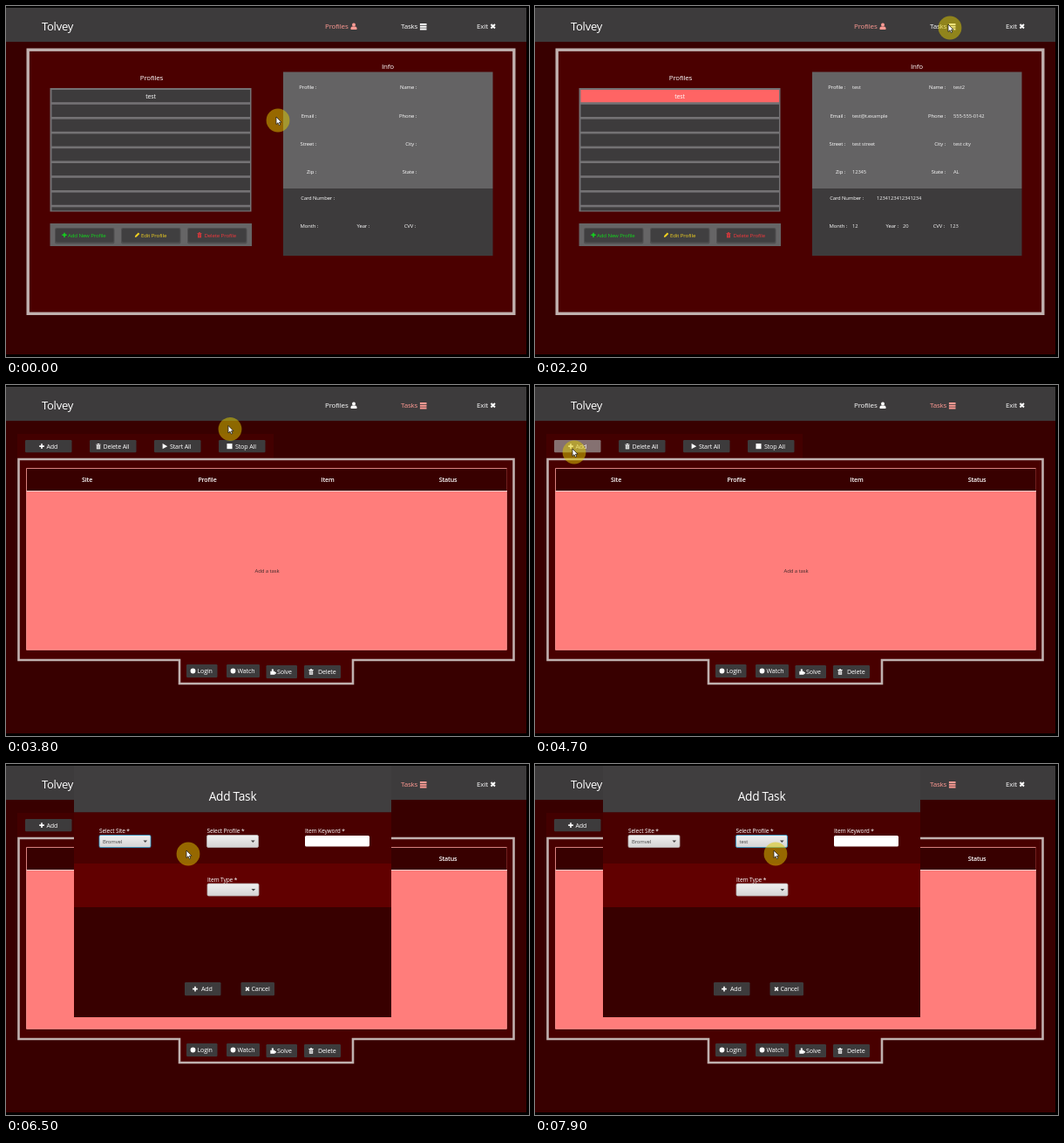
An HTML page for the animation above (8 s loop, 600 px wide and 402 px high).

```html
<!DOCTYPE html>
<html lang="en">
<head>
<meta charset="utf-8">
<title>Task manager walkthrough</title>
<style>
  html, body { margin: 0; width: 100%; height: 100%; overflow: hidden; background: #000; }
  svg { display: block; width: 100vw; height: 100vh; }
  text { font-family: "Open Sans", "Noto Sans", sans-serif; letter-spacing: -0.02em; white-space: pre; }
</style>
</head>
<body>
<svg id="stage" viewBox="0 0 600 402"></svg>
<script>
const LOOP = 8000, STEP = 100;
const GREY = '#3d3b3c', DARK = '#380000', WINE = '#4a0000', FRAME = '#c0b1af', PINK = '#ff9a93';

const rect = (x, y, w, h, fill, extra = '') =>
  `<rect x="${x}" y="${y}" width="${w}" height="${h}" fill="${fill}" ${extra}/>`;
const text = (x, y, size, str, fill = '#fff', anchor = 'start', weight = 400) =>
  `<text x="${x}" y="${y}" font-size="${size}" fill="${fill}" text-anchor="${anchor}" font-weight="${weight}">${str}</text>`;
const group = (id, body, extra = '') => `<g id="${id}" ${extra}>${body}</g>`;

// Icons are drawn around 0,0 in a box of about 8 units.
const ICONS = {
  user: '<circle cy="-2" r="2.1"/><path d="M-3.6 4V2Q-3.6 .2-1.8 .2H1.8Q3.6 .2 3.6 2V4Z"/>',
  tasks: '<path d="M-4-3.4H4V-1.2H-4ZM-4-.4H4V1.6H-4ZM-4 2.4H4V4.4H-4Z"/>',
  cross: '<path d="M-2.4-2.4L2.4 2.4M2.4-2.4L-2.4 2.4" stroke="currentColor" stroke-width="2.1"/>',
  plus: '<path d="M-1-3.5H1V-1H3.5V1H1V3.5H-1V1H-3.5V-1H-1Z"/>',
  pencil: '<path d="M-3.5 3.5L-3 1L1.8-3.7L3.7-1.8L-1 3Z"/>',
  trash: '<path d="M-3.3-3H-1.2V-4H1.2V-3H3.3V-2H-3.3Z"/><path d="M-2.7-1.4H2.7V4H-2.7Z"/><path d="M-1.1-.5V3M1.1-.5V3" stroke="#3d3b3c" stroke-width=".8"/>',
  play: '<path d="M-3-4L4 0L-3 4Z"/>',
  stop: '<path d="M-3.8-3.8H3.8V3.8H-3.8Z"/>',
  puzzle: '<path d="M-4-1H-1.7Q-3-4-.8-4Q1.3-4 .2-1H2.5V.7Q4.5 0 4.5 1.7Q4.5 3.2 2.5 2.6V4H-4Z"/>',
  dot: '<circle r="3.6"/>'
};
const icon = (name, x, y, scale = 0.8, color = '#fff') =>
  `<g transform="translate(${x} ${y}) scale(${scale})" fill="${color}" color="${color}">${ICONS[name]}</g>`;

function button(x, y, w, h, name, ix, tx, label, id = '') {
  const cy = y + h / 2;
  return rect(x, y, w, h, GREY, `rx="1.2" ${id && `id="${id}"`}`) +
    icon(name, ix, cy) + text(tx, cy + 2.5, 7.1, label, '#fff', 'start', 500);
}

function navItem(id, x, label, name, ix) {
  return group(id, text(x, 26, 8, label, 'currentColor', 'start', 500) +
    icon(name, ix, 23.3, 0.95, 'currentColor'), 'color="#fff"');
}

function header() {
  return rect(0, 2, 597, 39, GREY) + text(41, 28, 13, 'Tolvey') +
    navItem('navProfiles', 366, 'Profiles', 'user', 399) +
    navItem('navTasks', 453, 'Tasks', 'tasks', 478.7) +
    navItem('navExit', 540, 'Exit', 'cross', 558.7);
}

function profileButton(x, color, name, ix, tx, label) {
  return rect(x - 1, 254, 68.5, 18.5, '#515051', 'rx="2"') + rect(x, 255, 66.5, 15.5, '#403f40', 'rx="1.5"') +
    icon(name, ix, 262.3, 0.75, color) + text(tx, 264.8, 6.1, label, color, 'start', 500);
}

function profilesPage() {
  let s = rect(25.2, 50.2, 557.6, 302.1, '#4b0000', `stroke="${FRAME}" stroke-width="3.4"`);
  s += text(167, 85, 8, 'Profiles', '#fff', 'middle', 500) + rect(50.5, 94, 231, 141.5, '#747274');
  for (let i = 0; i < 9; i++) {
    const y = 96 + 16.8 * i;
    s += rect(52.5, y, 227.5, Math.min(14.2, 234.3 - y), GREY, i ? '' : 'id="firstRow"');
  }
  s += text(166, 105.5, 6.9, 'test', '#fff', 'middle');
  s += rect(50.5, 249, 231.5, 26, '#666566') +
    profileButton(57, '#12d81c', 'plus', 67, 71, 'Add New Profile') +
    profileButton(133, '#f0d020', 'pencil', 150.5, 155, 'Edit Profile') +
    profileButton(209, '#f0383c', 'trash', 222, 227.5, 'Delete Profile');

  s += text(438, 72, 8, 'Info', '#fff', 'middle', 500) +
    rect(318, 75.5, 240.5, 133.5, '#646364') + rect(318, 209, 240.5, 77, GREY);
  const fields = [
    [356, 95, 'Profile', 364, 'test'], [471, 95, 'Name', 480, 'test2'],
    [356, 127.5, 'Email', 364, 'test@t.example'], [471, 127.5, 'Phone', 480, '555-555-0142'],
    [356, 159.5, 'Street', 364, 'test street'], [471, 159.5, 'City', 480, 'test city'],
    [356, 191.5, 'Zip', 364, '12345'], [471, 191.5, 'State', 480, 'AL'],
    [377, 222, 'Card Number', 392, '1234123412341234'],
    [358, 254, 'Month', 364, '12'], [417, 254, 'Year', 422, '20'], [470, 254, 'CVV', 476, '123']
  ];
  s += fields.map(([x, y, label]) => text(x, y, 5.9, label + ' :', '#fff', 'end', 500)).join('');
  return s + group('values', fields.map(([, y, , x, v]) => text(x, y + 0.4, 5.8, v, '#f4f4f4')).join(''));
}

function tasksPage() {
  return rect(13, 56, 294, 28, '#430000') +
    button(22, 63, 53.5, 14.3, 'plus', 41, 46.5, 'Add', 'addButton') +
    button(96, 63, 53.5, 14.3, 'trash', 106, 111.5, 'Delete All') +
    button(170, 63, 53.5, 14.3, 'play', 182, 188, 'Start All') +
    button(244, 63, 53.5, 14.3, 'stop', 256.5, 263, 'Stop All') +
    `<path d="M14.5 85H582.5V315H398V342H199V315H14.5Z" fill="#480000" stroke="${FRAME}" stroke-width="2.6"/>` +
    rect(23.5, 95.5, 551, 208, '#ff7d7b') + rect(23.5, 95.5, 551, 26, DARK) +
    '<path d="M23.5 122V95.5H574.5" fill="none" stroke="#d88280"/><path d="M23.5 121.5H575" stroke="#f3cfcd"/>' +
    '<path d="M23.5 122V303.3H574.3V122" fill="none" stroke="#ff9c9a" stroke-width=".8"/>' +
    [['Site', 93], ['Profile', 231], ['Item', 369], ['Status', 507]]
      .map(([label, x]) => text(x, 110.5, 7.1, label, '#fff', 'middle', 600)).join('') +
    text(299.5, 215.3, 6, 'Add a task', '#3b2929', 'middle') +
    button(207, 320, 35.5, 15, 'dot', 214.5, 219.5, 'Login') +
    button(253, 320, 38, 15, 'dot', 260.5, 265.5, 'Watch') +
    button(298.5, 321, 35.5, 15, 'puzzle', 306.5, 311, 'Solve') +
    button(342, 321, 42, 15, 'trash', 350, 358, 'Delete');
}

function combo(id, x, y, value) {
  return rect(x, y, 59, 14, 'url(#comboFill)', `id="${id}Box" rx="1.5" stroke="#b5b1b1" stroke-width=".8"`) +
    `<path d="M${x + 50.5} ${y + 6}h4.6l-2.3 2.6z" fill="#444"/>` +
    group(id + 'Value', text(x + 4, y + 9.3, 5.9, value, '#444'));
}

function popup(id, x, y, value) {
  return group(id, rect(x, y, 59, 14, '#f6f6f6', 'stroke="#bbb" stroke-width=".7"') +
    rect(x + 0.5, y + 1, 58, 12, '#0a93c4') + text(x + 4, y + 9.2, 5.9, value));
}

function dialog() {
  const label = (x, y, str) => text(x, y, 6.6, str, '#fff', 'start', 500);
  return rect(78, 2, 364, 288, DARK) + rect(78, 2, 364, 53.5, '#403e3f') +
    rect(78, 55.5, 364, 58.5, WINE) + rect(78, 114, 364, 50, '#610000') +
    text(260, 41.5, 13.7, 'Add Task', '#fff', 'middle') +
    label(107, 78.8, 'Select Site *') + label(230.5, 78.8, 'Select Profile *') +
    label(343, 78.8, 'Item Keyword *') + label(231, 134.5, 'Item Type *') +
    combo('site', 107, 81.5, 'Bromvel') + combo('profile', 230.5, 81.5, 'test') +
    rect(343, 82, 74, 12.5, '#fff', 'rx="1.5"') + combo('type', 231, 137, '') +
    button(205, 250, 41.5, 15.3, 'plus', 217, 224, 'Add') +
    button(269.5, 250, 38.5, 15.3, 'cross', 277, 281.5, 'Cancel') +
    popup('siteList', 107, 96, 'Bromvel') + popup('profileList', 230.5, 96, 'test');
}

const cursor = '<circle r="13.4" fill="#dcc800" fill-opacity=".52"/>' +
  '<path d="M-2-4V4.5L0 2.7L1.4 5.7L2.8 5L1.4 2.2H4Z" fill="#fff" stroke="#111" stroke-width=".7"/>';

const stage = document.getElementById('stage');
stage.innerHTML = '<defs><linearGradient id="comboFill" x2="0" y2="1">' +
  '<stop stop-color="#f0f0f0"/><stop offset="1" stop-color="#d4d3d3"/></linearGradient></defs>' +
  rect(0, 0, 600, 402, '#000') + rect(0, 2, 597, 397, DARK) + header() +
  group('profilesPage', profilesPage()) + group('tasksPage', tasksPage()) +
  group('dialog', dialog()) + group('cursor', cursor);

const el = id => document.getElementById(id);
const show = (id, on) => el(id).setAttribute('display', on ? 'inline' : 'none');
const within = (t, from, to) => t >= from && t < to;

// time, x, y of the pointer's halo
const PATH = [
  [0, 312, 131], [900, 256, 104], [1100, 256, 104], [2000, 491, 29], [2200, 476, 25],
  [2400, 469, 24], [3200, 469, 24], [4400, 45, 77], [4900, 45, 77], [5400, 136, 90],
  [5700, 136, 90], [6000, 140, 103], [6200, 140, 103], [6500, 209, 103], [6900, 266, 89],
  [7300, 268, 89], [7600, 276, 103], [LOOP, 276, 103]
];

function pointer(t) {
  const i = PATH.findIndex(p => p[0] > t);
  const [t0, x0, y0] = PATH[i - 1], [t1, x1, y1] = PATH[i];
  const u = (t - t0) / (t1 - t0);
  const k = t1 - t0 > 600 ? u * u * (3 - 2 * u) : u;
  return [x0 + (x1 - x0) * k, y0 + (y1 - y0) * k];
}

function focus(id, on) {
  el(id + 'Box').setAttribute('stroke', on ? '#2a9fd0' : '#b5b1b1');
}

function draw(t) {
  const onTasks = t >= 2700, selected = t >= 1000, open = t >= 5000;
  const [x, y] = pointer(t);
  show('profilesPage', !onTasks);
  show('tasksPage', onTasks);
  show('dialog', open);
  show('values', selected);
  el('firstRow').setAttribute('fill', selected ? '#ff6464' : GREY);
  el('navProfiles').setAttribute('color', onTasks ? '#fff' : PINK);
  el('navTasks').setAttribute('color', onTasks ? PINK : '#fff');

  const hover = !open && within(x - 2, 22, 75.5) && within(y - 4, 63, 77.3);
  el('addButton').setAttribute('fill', hover ? '#857171' : GREY);

  focus('site', within(t, 5300, 7200));
  focus('profile', t >= 7200);
  show('siteList', within(t, 5700, 6200));
  show('profileList', within(t, 7300, 7700));
  show('siteValue', t >= 6200);
  show('profileValue', t >= 7700);
  el('cursor').setAttribute('transform', `translate(${x.toFixed(2)} ${y.toFixed(2)})`);
}

const start = performance.now();
function tick() {
  const t = (performance.now() - start) % LOOP;
  draw(Math.floor(t / STEP) * STEP);
  requestAnimationFrame(tick);
}
tick();
</script>
</body>
</html>
```
